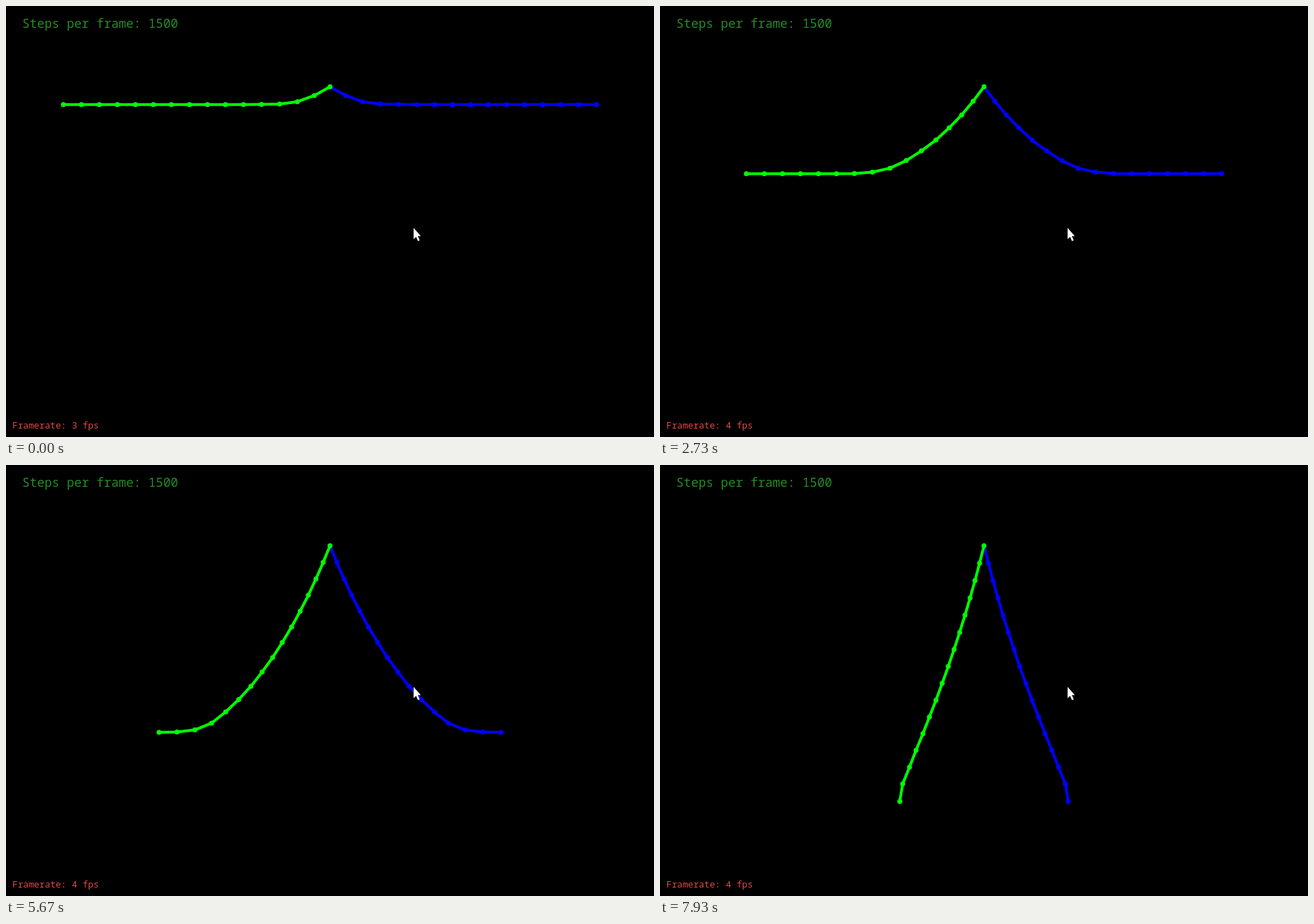
Animation, 917 px wide and 611 px high, one loop 8 s. Source, as an HTML page with a canvas:

```html
<!DOCTYPE html>
<html lang="en">
<head>
<meta charset="utf-8">
<title>Falling chains</title>
<style>
  html, body { margin: 0; width: 100%; height: 100%; overflow: hidden; background: #000; }
  canvas, svg { position: absolute; left: 0; top: 0; width: 917px; height: 611px; }
  text { font-family: "Roboto Mono", "Noto Sans Mono", "DejaVu Sans Mono", monospace; white-space: pre; }
</style>
</head>
<body>
<canvas id="stage" width="917" height="611"></canvas>
<svg viewBox="0 0 917 611">
  <text x="23" y="30.5" font-size="17.5" fill="#268a26">Steps per frame: 1500</text>
  <text id="rate" x="9" y="598.5" font-size="12.75" fill="#e04a4a">Framerate: 3 fps</text>
  <path d="M576.8 314.6V330.4L580.3 327.2 583 333.2 585.5 332.2 582.8 326.3H587Z"
        fill="#fff" stroke="#000" stroke-width="1" paint-order="stroke"/>
</svg>
<script>
const LOOP = 8000;
const PIVOT = { x: 458.5, y: 114.5 };
const LINKS = 15, LENGTH = 25.49;

// Units: pixels and simulation ticks.
const DRAG = 0.08, GRAVITY = 12.45 * DRAG;
const LEAD = 7.85;      // ticks already fallen when the loop starts
const SUBSTEPS = 40;

// Each tick is held for 3 or 4 units of 1/15 s.
const HOLDS = "43434334343343334343343434343343433";
const tickTimes = [0];
let units = 0;
for (const hold of HOLDS) {
  units += Number(hold);
  tickTimes.push(Math.round(units * 20 / 3) * 10);
}

// Angular acceleration of every link, from the tensions that keep lengths fixed.
function accelerate(angle, spin) {
  const n = LINKS, upper = [], tension = [];
  for (let i = 0; i < n; i++) {
    const back = i ? -Math.cos(angle[i] - angle[i - 1]) : 0;
    const next = i < n - 1 ? -Math.cos(angle[i + 1] - angle[i]) : 0;
    const load = LENGTH * spin[i] ** 2 + (i ? 0 : GRAVITY * Math.sin(angle[0]));
    const pivot = (i ? 2 : 1) - (i ? back * upper[i - 1] : 0);
    upper[i] = next / pivot;
    tension[i] = (load - (i ? back * tension[i - 1] : 0)) / pivot;
  }
  for (let i = n - 2; i >= 0; i--) tension[i] -= upper[i] * tension[i + 1];

  return angle.map((a, i) => {
    let pull = i ? tension[i - 1] * Math.sin(angle[i - 1] - a) : GRAVITY * Math.cos(a);
    if (i < n - 1) pull += tension[i + 1] * Math.sin(angle[i + 1] - a);
    return pull / LENGTH - DRAG * spin[i];
  });
}

const add = (a, b, k) => a.map((v, i) => v + b[i] * k);

// One Runge-Kutta step
function advance({ angle, spin }, dt) {
  const a1 = accelerate(angle, spin);
  const s2 = add(spin, a1, dt / 2);
  const a2 = accelerate(add(angle, spin, dt / 2), s2);
  const s3 = add(spin, a2, dt / 2);
  const a3 = accelerate(add(angle, s2, dt / 2), s3);
  const s4 = add(spin, a3, dt);
  const a4 = accelerate(add(angle, s3, dt), s4);
  const mean = (p, q, r, s) => p.map((v, i) => (v + 2 * q[i] + 2 * r[i] + s[i]) / 6);
  return {
    angle: add(angle, mean(spin, s2, s3, s4), dt),
    spin: add(spin, mean(a1, a2, a3, a4), dt)
  };
}

function run(state, ticks) {
  const count = Math.ceil(ticks * SUBSTEPS);
  for (let i = 0; i < count; i++) state = advance(state, ticks / count);
  return state;
}

const rest = () => new Array(LINKS).fill(0);
const poses = [];
let state = run({ angle: rest(), spin: rest() }, LEAD);
for (let i = 0; i < tickTimes.length; i++) {
  poses.push(state.angle);
  state = run(state, 1);
}

const ctx = document.getElementById("stage").getContext("2d");
const rate = document.getElementById("rate");

function drawChain(angles, side, color) {
  let { x, y } = PIVOT;
  const joints = [[x, y]];
  for (const a of angles) {
    x += side * LENGTH * Math.cos(a);
    y += LENGTH * Math.sin(a);
    joints.push([x, y]);
  }
  ctx.strokeStyle = ctx.fillStyle = color;
  ctx.lineWidth = 4;
  ctx.lineJoin = "round";
  ctx.beginPath();
  for (const [px, py] of joints) ctx.lineTo(px, py);
  ctx.stroke();
  for (const [px, py] of joints) {
    ctx.beginPath();
    ctx.arc(px, py, 3.5, 0, 2 * Math.PI);
    ctx.fill();
  }
}

let start = null, shown = -1;
function frame(now) {
  if (start === null) start = now;
  const t = (now - start) % LOOP;
  let tick = tickTimes.length - 1;
  while (tickTimes[tick] > t) tick--;
  if (tick !== shown) {
    shown = tick;
    ctx.fillStyle = "#000";
    ctx.fillRect(0, 0, 917, 611);
    drawChain(poses[tick], 1, "#00f");
    drawChain(poses[tick], -1, "#0f0");
    rate.textContent = `Framerate: ${t < 1200 ? 3 : 4} fps`;
  }
  requestAnimationFrame(frame);
}
requestAnimationFrame(frame);
</script>
</body>
</html>
```
